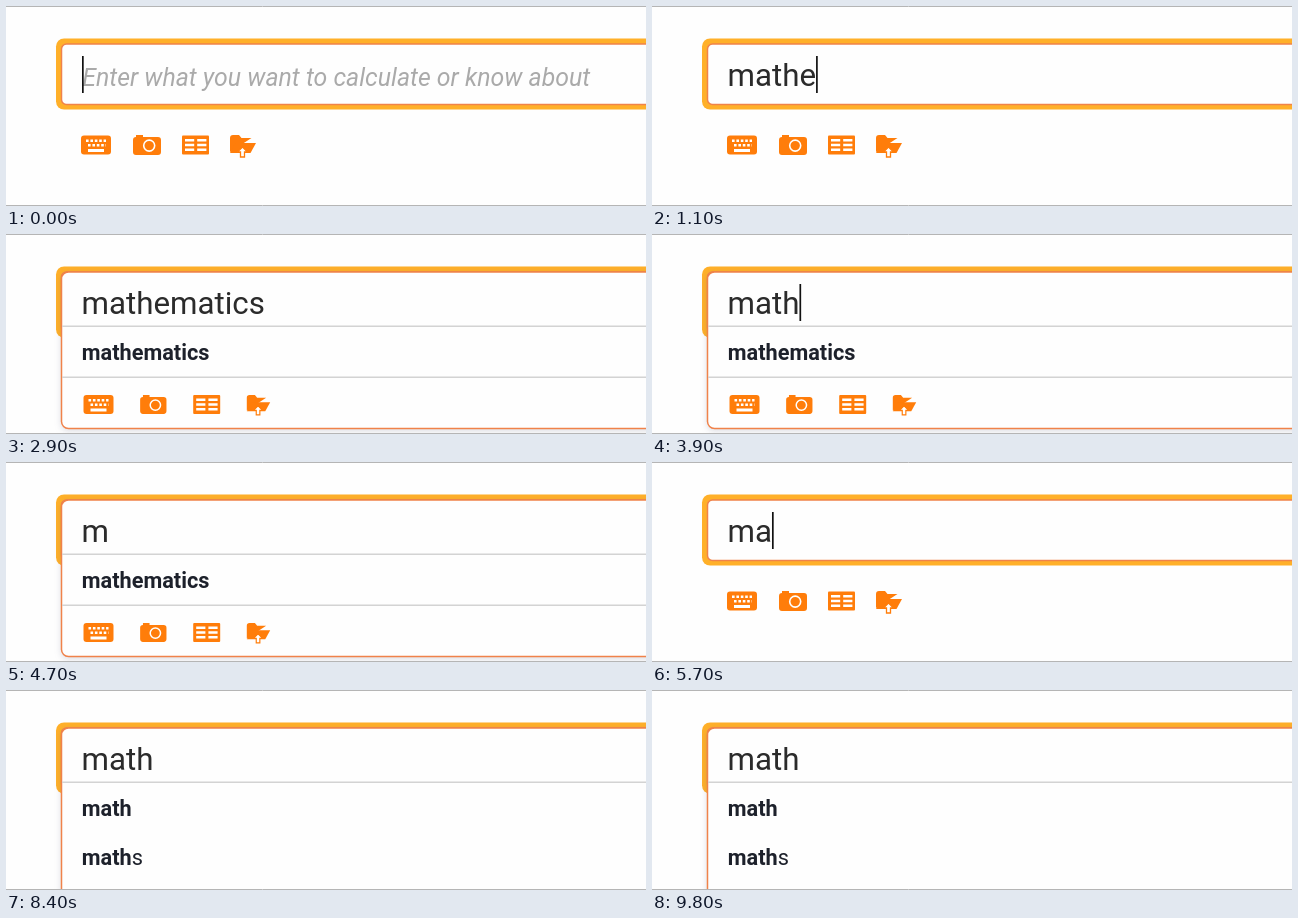
Write an HTML page that moves like this. It is 640 by 200 pixels and loops after 9900 ms.

```html
<!DOCTYPE html>
<html lang="en">
<head>
<meta charset="utf-8">
<title>Search box</title>
<style>
  html, body { margin: 0; width: 100%; height: 100%; overflow: hidden; background: #fefefe; }
  svg { display: block; }
  text { font-family: Roboto, sans-serif; white-space: pre; }
  #query { font-size: 31.3px; fill: #2b2b2b; }
  #hint { font-size: 24.9px; font-style: italic; fill: #aaa; }
  .item { font-size: 21.7px; fill: #1d212b; }
  .item tspan { font-weight: 700; }
  .icon { fill: #ff7d0a; }
  .cut { fill: #fff; }
  .rule { fill: #d3d3d3; }
  .panel { fill: #fefefe; stroke: #f0824a; stroke-width: 1.5; }
  #list .panel { filter: drop-shadow(0 2px 3px #5050702e); }
</style>
</head>
<body>
<svg width="640" height="200" viewBox="0 0 640 200">
  <rect x="50" y="32.5" width="700" height="71" rx="8" fill="#ffb029"/>
  <rect class="panel" x="55.5" y="38" width="690" height="60.5" rx="5"/>

  <g id="list">
    <rect class="panel" x="55.5" y="38" width="690" height="156.5" rx="7"/>
    <rect class="rule" x="56" y="91.5" width="584" height="1.5"/>
    <rect class="rule" id="divider" x="56" y="142.5" width="584" height="1.5"/>
    <text class="item" x="75.8" y="125.5"><tspan id="first"></tspan></text>
    <text class="item" id="second" x="75.8" y="175"><tspan>math</tspan>s</text>
  </g>

  <g id="icons">
    <g class="icon">
      <rect x="-15" y="-9.5" width="30" height="19" rx="3"/>
      <path class="cut" d="M-8 4h16v3h-16z"/>
      <path d="M-10-4.2h20M-8 .3h18" stroke="#fff" stroke-width="2.6" stroke-dasharray="2.6 1.8"/>
    </g>
    <g class="icon">
      <path d="M-14-5q0-3 3-3v-2h7v2h15q3 0 3 3v12q0 3-3 3h-22q-3 0-3-3z"/>
      <circle cx="2.2" cy=".6" r="5.5" fill="none" stroke="#fff" stroke-width="1.6"/>
    </g>
    <g class="icon">
      <rect x="-13.5" y="-9.5" width="27" height="19" rx="1"/>
      <path d="M-10.5-4.8h9.2m3 0h9.2M-10.5 0h9.2m3 0h9.2M-10.5 4.8h9.2m3 0h9.2" stroke="#fff" stroke-width="2.6"/>
    </g>
    <g class="icon">
      <path d="M-13 6v-14q0-3 3-3h6l2.5 3h10q2.500 2.500 2.500v1.500h-17z"/>
      <path d="M-7.500-3h20.500l-5.500 10h-20.500z"/>
      <path class="cut" d="M-.5 1l5 5h-3v5h-4v-5h-3z" stroke="#ff7d0a" stroke-width="1.3"/>
    </g>
  </g>

  <text id="hint" x="76.2" y="79.5">Enter what you want to calculate or know about</text>
  <text id="query" x="75.5" y="79.5"></text>
  <rect id="caret" y="50" width="1.7" height="37" fill="#111"/>
  <path d="M0 .5h640M0 199.500h640" stroke="#b5b5b5"/>
</svg>
<script>
const LOOP = 9900, BLINK = 500, TEXT_X = 75.5;
const $ = id => document.getElementById(id);
const show = (id, on) => $(id).style.display = on ? '' : 'none';

// Key presses: [time, text after the press]
const keys = [[0, '']];
const type = (word, from, times) =>
  times.forEach((time, i) => keys.push([time, word.slice(0, from + i + 1)]));

type('mathematics', 0, [600, 700, 900, 1000, 1100, 1400, 1550, 1700, 1850, 2000, 2200]);
for (let left = 10; left > 0; left--) keys.push([3300 + (10 - left) * 100, 'mathematics'.slice(0, left)]);
keys.push([4900, '']);
type('math', 0, [5600, 5700, 5800, 5900]);

// Icon centres and scale, below the box and inside the list
const closedIcons = [[90, 139, 1], [141, 139, 1], [189.5, 139, 1], [237, 140, 1]];
const openIcons = [[92.5, 170.5, 1], [147.3, 170.5, .94], [200.7, 170.5, 1], [252.5, 171, .9]];

function draw(t) {
  const [keyTime, text] = keys.findLast(([time]) => time <= t);
  const longList = t >= 7500;
  const open = longList || (t >= 2500 && t < 4900);

  $('query').textContent = text;
  show('hint', !text);
  $('caret').setAttribute('x', text ? TEXT_X + $('query').getComputedTextLength() : 76);
  show('caret', (t - keyTime) % (2 * BLINK) < BLINK);

  show('list', open);
  show('divider', !longList);
  show('second', longList);
  $('first').textContent = longList ? 'math' : 'mathematics';
  $('list').firstElementChild.setAttribute('height', longList ? 220 : 156.5);

  show('icons', !longList);
  (open ? openIcons : closedIcons).forEach(([x, y, s], i) =>
    $('icons').children[i].setAttribute('transform', `translate(${x} ${y}) scale(${s})`));
}

const start = performance.now();
function tick() {
  draw((performance.now() - start) % LOOP);
  requestAnimationFrame(tick);
}
tick();
</script>
</body>
</html>
```
